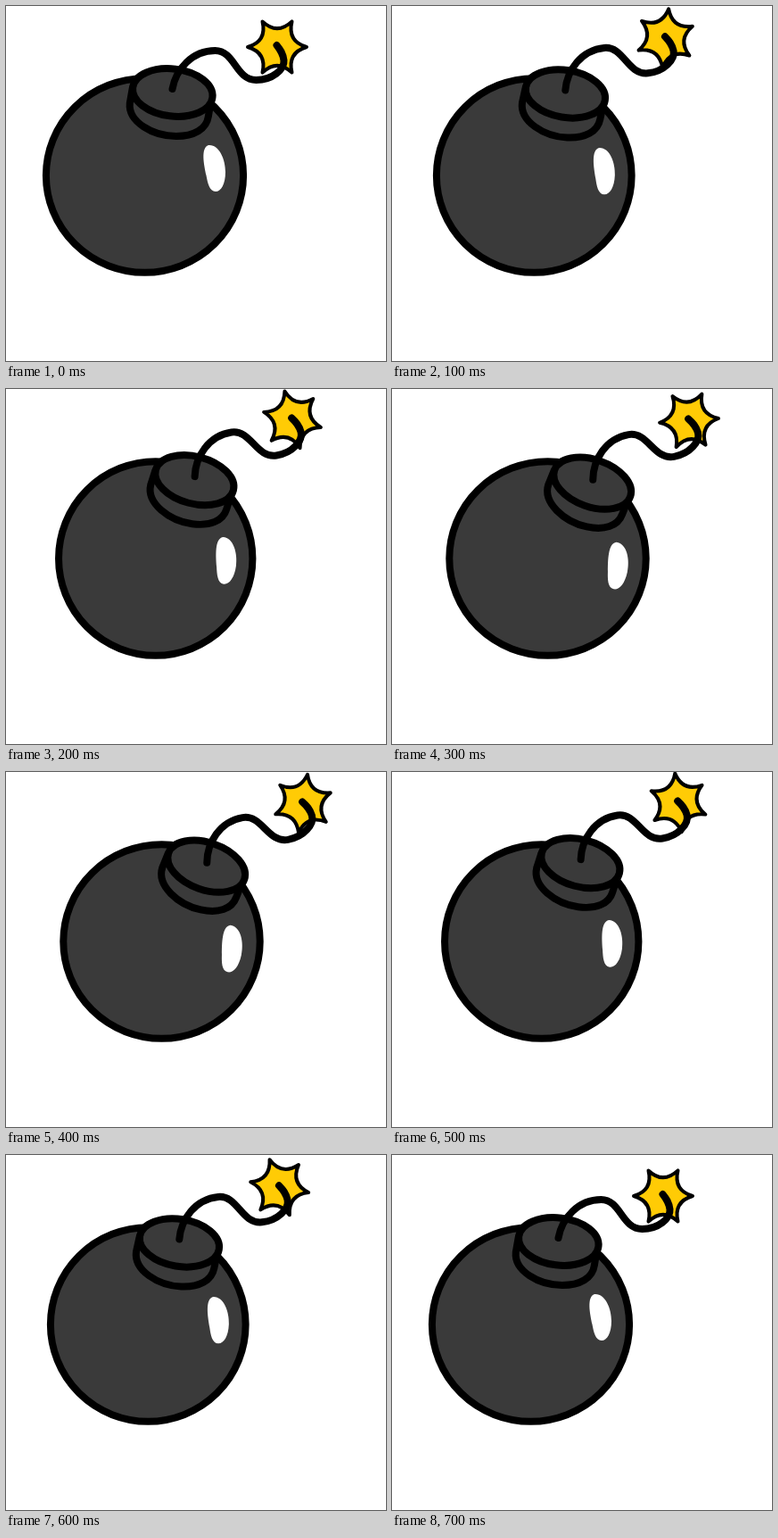
An HTML page that plays this animation: 426x398 px, repeating every 750 ms.

```html
<!DOCTYPE html>
<html lang="en">
<head>
<meta charset="utf-8">
<title>Rocking bomb</title>
<style>
  html, body { margin: 0; width: 100%; height: 100%; overflow: hidden; background: #fff; }
  svg { display: block; width: 100vw; height: 100vh; }
  .ink { fill: #3a3a3a; stroke: #000; stroke-width: 8; stroke-linecap: round; stroke-linejoin: round; }
  .line { fill: none; }
  #star { fill: #ffcb05; stroke-width: 4; }
</style>
</head>
<body>
<svg viewBox="0 0 426 398">
  <ellipse id="body" class="ink" cy="190" ry="108.8"/>
  <!-- drawn in the upright pose, with the body centre at 155.5, 190 -->
  <g id="shell">
    <g transform="translate(-1.2 2)">
      <path class="ink" d="M143 90L140 107C138 128 166 144 192 144C212 144 226 136 228 122L231 104"/>
      <ellipse class="ink" cx="188" cy="95" rx="45" ry="26.5" transform="rotate(7 188 95)"/>
    </g>
    <path fill="#fff" d="M227 156C239 155 246 172 246 186C246 200 241 208 235 208C228 208 226 198 224.5 190C222 178 218 159 227 156Z"/>
  </g>
  <g id="fuse">
    <path id="star" class="ink"/>
    <path class="ink line" d="M0 0C4 -22 22 -43 48 -43C70 -43 71 -10 94 -10C112 -10 126 -22 125 -32C124 -40 121 -44 117 -49"/>
  </g>
</svg>
<script>
  const LOOP = 750, STEP = 50, SWING = 700;
  const HOME = { x: 155.5, y: 190 };
  const ROOT = { x: 31, y: -97 };   // fuse base, relative to the body centre
  const TILT = 12.8, ROLL = 20;

  const [body, shell, fuse, star] =
    ['body', 'shell', 'fuse', 'star'].map(id => document.getElementById(id));

  const polar = (r, deg) => {
    const a = deg * Math.PI / 180;
    return `${(r * Math.cos(a)).toFixed(2)} ${(r * Math.sin(a)).toFixed(2)}`;
  };

  function starPath(tips, outer, dip) {
    const turn = 360 / tips;
    let d = `M${polar(outer, 0)}`;
    for (let i = 1; i <= tips; i++) {
      d += `Q${polar(dip, (i - 0.5) * turn)} ${polar(outer, i * turn)}`;
    }
    return d + 'Z';
  }
  star.setAttribute('d', starPath(6, 33, 13));

  function draw(t) {
    const u = t / SWING;
    const lean = (1 - Math.cos(2 * Math.PI * u)) / 2;
    const x = HOME.x + ROLL * lean;
    const tilt = TILT * lean;
    const a = tilt * Math.PI / 180;

    body.setAttribute('cx', x);
    body.setAttribute('rx', 108.6 + 2 * (2 * lean - 1) ** 2);
    shell.setAttribute('transform',
      `translate(${x - HOME.x} 0) rotate(${tilt} ${HOME.x} ${HOME.y})`);

    // The fuse hangs from the cap but lags behind its turn
    const fx = x + ROOT.x * Math.cos(a) - ROOT.y * Math.sin(a);
    const fy = HOME.y + ROOT.x * Math.sin(a) + ROOT.y * Math.cos(a);
    fuse.setAttribute('transform',
      `translate(${fx} ${fy}) rotate(${-10 * Math.pow(Math.max(lean, 0), 0.35)})`);

    const spin = -120 * u - 3 * Math.sin(Math.PI * u);
    star.setAttribute('transform', `translate(117.5 -47) rotate(${spin})`);
  }

  const start = performance.now();
  function tick() {
    const t = (performance.now() - start) % LOOP;
    draw(Math.floor(t / STEP) * STEP);
    requestAnimationFrame(tick);
  }
  draw(0);
  requestAnimationFrame(tick);
</script>
</body>
</html>
```
